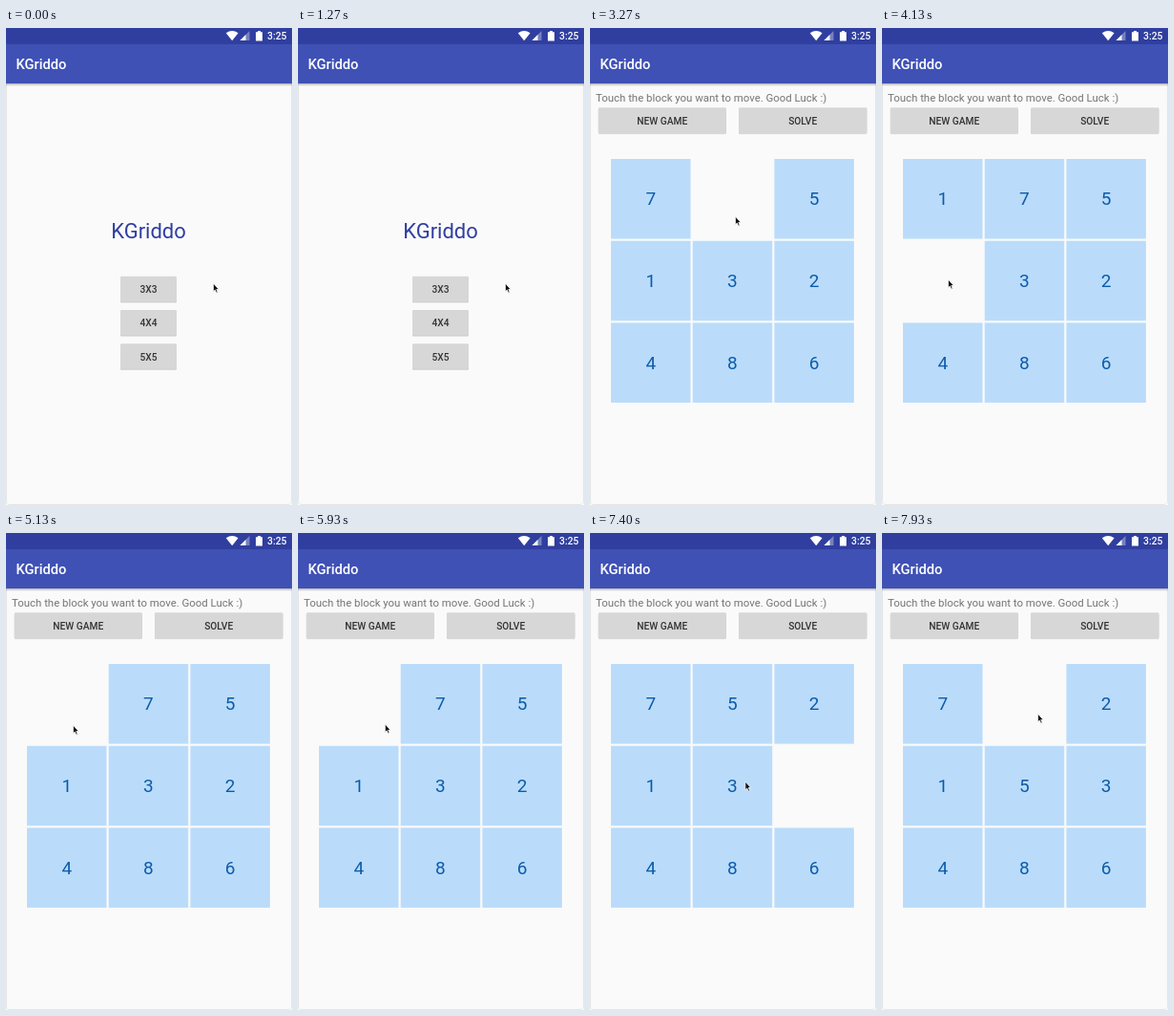
Write an HTML page that moves like this. It is 300 by 499 pixels and loops after 8 s.

```html
<!DOCTYPE html>
<html lang="en">
<head>
<meta charset="utf-8">
<title>Sliding tiles</title>
<style>
  html, body { margin: 0; width: 100%; height: 100%; overflow: hidden; background: #fff; }
  svg { display: block; width: 100%; height: 100%; font-family: Roboto, "Noto Sans", sans-serif; }
  .mid { text-anchor: middle; }
  .btn text { font-size: 10.2px; font-weight: 500; fill: #333; }
  .tile rect { fill: #badcfa; }
  .tile text { font-size: 19px; fill: #0d5cab; }
</style>
</head>
<body>
<svg viewBox="0 0 300 499">
  <defs>
    <linearGradient id="fall" x2="0" y2="1">
      <stop offset="0" stop-color="#000" stop-opacity=".28"/>
      <stop offset="1" stop-color="#000" stop-opacity="0"/>
    </linearGradient>
  </defs>
  <rect x=".5" y="-5" width="299" height="503.5" rx="3" fill="#fafafa" stroke="#e6e6e6"/>
  <rect y="58" width="300" height="3" fill="url(#fall)"/>
  <rect y="17" width="300" height="41" fill="#3f51b5"/>
  <rect width="300" height="17" fill="#303f9f"/>
  <text x="10.5" y="43.3" font-size="14.7" font-weight="500" fill="#fff">KGriddo</text>
  <g fill="#fff">
    <path d="M230.8 5.2Q237.2 .8 243.6 5.2L237.2 13.2Z"/>
    <path d="M255.5 3V13H245.5Z" opacity=".35"/>
    <path d="M251.5 7V13H245.5Z"/>
    <path d="M262 4.2H264V3H267V4.2H269V13.4H262Z"/>
    <text x="274" y="12.4" font-size="10.4" font-weight="500">3:25</text>
  </g>
  <g id="menu">
    <text class="mid" x="149.5" y="220" font-size="22" fill="#303f9f">KGriddo</text>
  </g>
  <g id="game">
    <text x="6" y="76.6" font-size="11.42" fill="#757575">Touch the block you want to move. Good Luck :)</text>
  </g>
  <path id="cursor" d="M.4 0V8.8L2.3 7.1L3.7 10.2L5.2 9.5L3.8 6.5H6.3Z" fill="#111" stroke="#fff" stroke-width=".8"/>
</svg>
<script>
const LOOP = 8000, OPEN = 1800, GLIDE = 400;
const PITCH = 85.7, SIZE = 83.5, LEFT = 22, TOP = 137;

const $ = id => document.getElementById(id);
const menu = $('menu'), game = $('game'), cursor = $('cursor');

function add(parent, name, attrs = {}, text = '') {
  const node = document.createElementNS('http://www.w3.org/2000/svg', name);
  for (const key in attrs) node.setAttribute(key, attrs[key]);
  node.textContent = text;
  return parent.appendChild(node);
}

function button(parent, x, y, width, label) {
  const g = add(parent, 'g', { class: 'btn' });
  const box = { x, width, height: 26.6, rx: 1.2 };
  add(g, 'rect', { ...box, y: y + 1.3, fill: '#000', opacity: .08 });
  add(g, 'rect', { ...box, y: y + .7, fill: '#000', opacity: .12 });
  add(g, 'rect', { ...box, y, fill: '#d7d7d7' });
  add(g, 'text', { class: 'mid', x: x + width / 2, y: y + 17.3 }, label);
}

[3, 4, 5].forEach((n, i) => button(menu, 120, 259.8 + i * 35.2, 59, `${n}X${n}`));
button(game, 8.8, 83.3, 134, 'NEW GAME');
button(game, 156, 83.3, 134.4, 'SOLVE');

const START = [7, 5, 0, 1, 3, 2, 4, 8, 6];

const tiles = START.filter(Boolean).sort().map(n => {
  const g = add(game, 'g', { class: 'tile' });
  add(g, 'rect', { width: SIZE, height: SIZE });
  add(g, 'text', { class: 'mid', x: SIZE / 2, y: 48.4 }, n);
  return g;
});

// Where and when the pointer taps; the first tap opens the game.
const REST = { x: 217, y: 267 };
const TAPS = [
  { t: 1700, x: 162, y: 274 },
  { t: 2950, x: 152, y: 197 },
  { t: 3680, x: 74, y: 194 },
  { t: 4090, x: 69, y: 263 },
  { t: 5050, x: 70, y: 201 },
  { t: 6200, x: 153, y: 196 },
  { t: 6570, x: 229, y: 196 },
  { t: 6980, x: 229, y: 258 },
  { t: 7420, x: 162, y: 260 },
  { t: 7860, x: 163, y: 189 }
];

// A tapped tile jumps into the free cell.
function boardAt(t) {
  const board = START.slice();
  for (const tap of TAPS) {
    if (tap.t < OPEN || tap.t > t) continue;
    const cell = Math.floor((tap.x - LEFT) / PITCH) + 3 * Math.floor((tap.y - TOP) / PITCH);
    board[board.indexOf(0)] = board[cell];
    board[cell] = 0;
  }
  return board;
}

// The pointer eases towards each tap shortly before it happens.
function pointerAt(t) {
  let { x, y } = REST;
  for (const tap of TAPS) {
    const u = Math.min(1, Math.max(0, 1 - (tap.t - t) / GLIDE));
    const k = u * u * (3 - 2 * u);
    x += (tap.x - x) * k;
    y += (tap.y - y) * k;
  }
  return [x, y];
}

function draw(t) {
  const open = t >= OPEN;
  menu.style.display = open ? 'none' : '';
  game.style.display = open ? '' : 'none';
  boardAt(t).forEach((n, i) => {
    if (n) tiles[n - 1].setAttribute('transform',
      `translate(${LEFT + i % 3 * PITCH} ${TOP + Math.floor(i / 3) * PITCH})`);
  });
  cursor.setAttribute('transform', `translate(${pointerAt(t)})`);
}

const begin = performance.now();
function tick() {
  draw((performance.now() - begin) % LOOP);
  requestAnimationFrame(tick);
}
tick();
</script>
</body>
</html>
```
